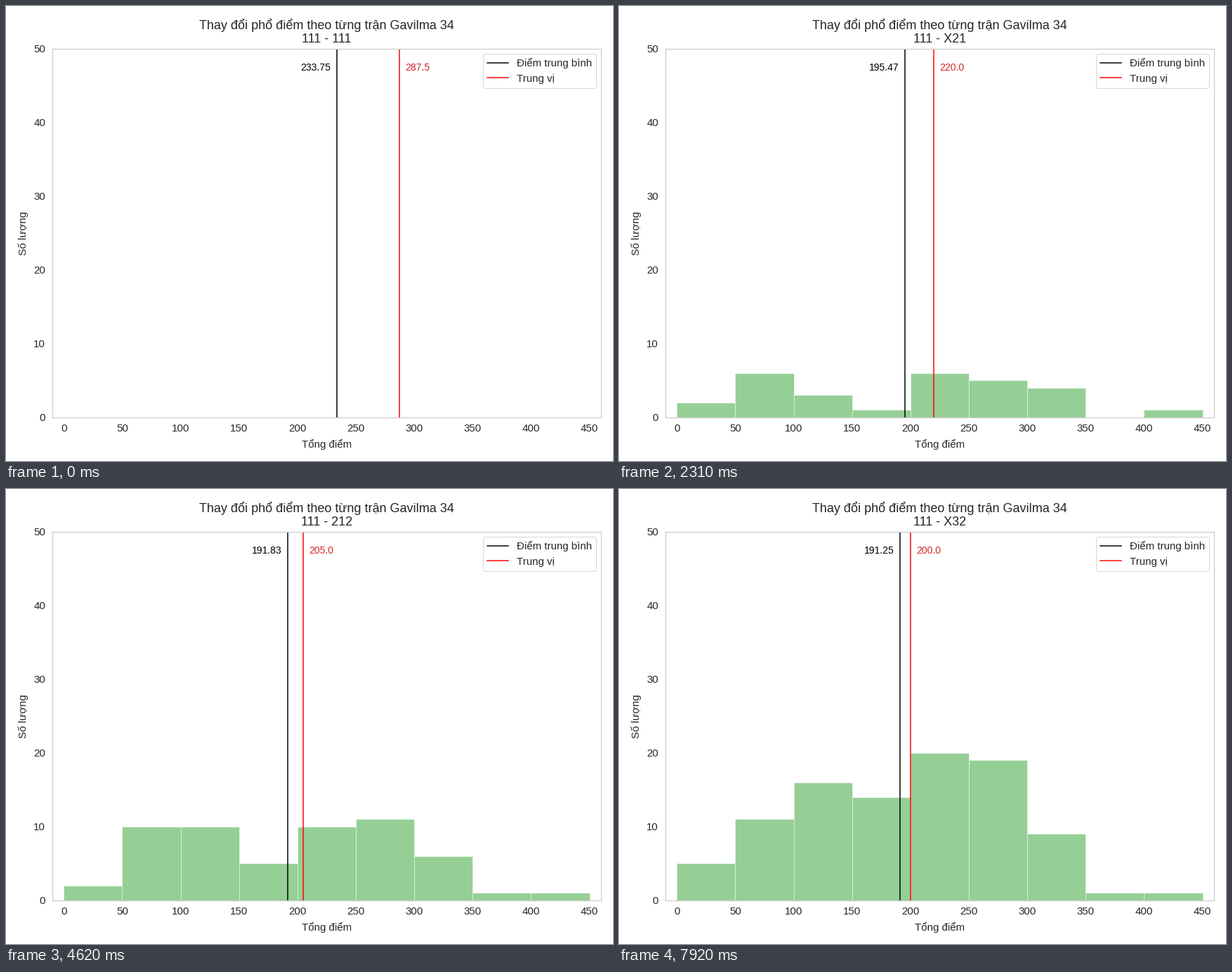
Write a matplotlib script that moves like this. It is 864 by 648 pixels and loops after 8 s.

```python
import matplotlib.pyplot as plt
import numpy as np
from itertools import accumulate
from matplotlib.animation import FuncAnimation

W, H, DPI = 864, 648, 72
LEFT, RIGHT, TOP, BOTTOM = 65.7, 847.2, 60.7, 585.7
STEP_MS, TICK_MS, LOOP_MS = 330, 40, 8000
INK = "0.15"

# Histogram bins (50 points wide) hit by the four players of each match
HITS = ("0556 3444 0466 1115 1148 2245 1256 2345 1145 3556 2235 1234 "
        "1257 2246 3345 0235 2346 2345 4455 2256 0344 3344 0345 1256").split()
# Sum of the four scores of each match
TOTALS = [935, 815, 880, 505, 720, 760, 820, 820, 610, 1000, 675, 575, 815,
          765, 815, 565, 815, 765, 905, 760, 650, 755, 780, 830, 790]
# Running median up to each match; the last value holds to the end
MEDIANS = [287.5, 225.0, 230.0, 220.0, 220.0, 220.0, 220.0, 220.0, 215.0,
           220.0, 215.0, 210.0, 210.0, 210.0, 205.0, 200.0]

STEPS = len(TOTALS)
MEANS = [s / (4 * (i + 1)) for i, s in enumerate(accumulate(TOTALS))]


def match_codes():
    """Week, month and quarter of each match; X marks a final."""
    for quarter in "12":
        for month in "123":
            for week in "123X":
                yield week + month + quarter
        yield "XX" + quarter


CODES = list(match_codes())[:STEPS]


def counts(step):
    """Bin heights: all matches before the current one."""
    hits = [int(c) for c in "".join(HITS[:step])]
    return np.bincount(np.array(hits, dtype=int), minlength=9)


plt.rcParams.update({
    "font.family": ["Liberation Sans", "DejaVu Sans"],
    "font.size": 15,
    "text.color": INK,
    "axes.linewidth": 1.25,
    "axes.edgecolor": "0.8",
    "lines.linewidth": 1.5,
})

fig = plt.figure(figsize=(W / DPI, H / DPI), dpi=DPI, facecolor="white")
ax = fig.add_axes([LEFT / W, 1 - BOTTOM / H,
                   (RIGHT - LEFT) / W, (BOTTOM - TOP) / H])
ax.set(xlim=(-10, 460), ylim=(0, 50),
       xticks=range(0, 451, 50), yticks=range(0, 51, 10))
ax.tick_params(length=0, pad=9.5, labelcolor=INK)


def put(x, y, s, **kw):
    """Centred figure text with its baseline at pixel x, y."""
    return fig.text(x / W, 1 - y / H, s, ha="center", va="baseline", **kw)


MID_X, MID_Y = (LEFT + RIGHT) / 2, (TOP + BOTTOM) / 2
put(MID_X, 32.6, "Thay đổi phổ điểm theo từng trận Gavilma 34", fontsize=18)
span = put(MID_X, 52, "", fontsize=18)
put(MID_X, 628.6, "Tổng điểm")
put(29.4, MID_Y, "Số lượng", rotation=90, rotation_mode="anchor")

bars = ax.bar(np.arange(0, 450, 50), np.zeros(9), width=50, align="edge",
              color="tab:green", edgecolor="white", linewidth=1, alpha=0.5)
mean_line = ax.axvline(0, color="black", label="Điểm trung bình")
median_line = ax.axvline(0, color="red", label="Trung vị")
mean_text = ax.text(0, 47, "", color="black", fontsize=14)
median_text = ax.text(0, 47, "", color="tab:red", fontsize=14)
ax.legend(loc="upper right", edgecolor="0.8")


def mark(line, label, value, shift):
    line.set_xdata([value, value])
    label.set_x(value + shift)
    label.set_text(str(round(value, 2)))


def draw(i):
    # Count a change that falls inside a tick from the start of that tick
    step = min((i * TICK_MS + TICK_MS - 10) // STEP_MS, STEPS - 1)
    for bar, n in zip(bars, counts(step)):
        bar.set_height(n)
    mark(mean_line, mean_text, MEANS[step], -31)
    mark(median_line, median_text, MEDIANS[min(step, len(MEDIANS) - 1)], 5)
    span.set_text(f"{CODES[0]} - {CODES[step]}")
    return [*bars, mean_line, median_line, mean_text, median_text, span]


anim = FuncAnimation(fig, draw, frames=LOOP_MS // TICK_MS, interval=TICK_MS,
                     repeat=True, repeat_delay=0, blit=False)
plt.show()
```
